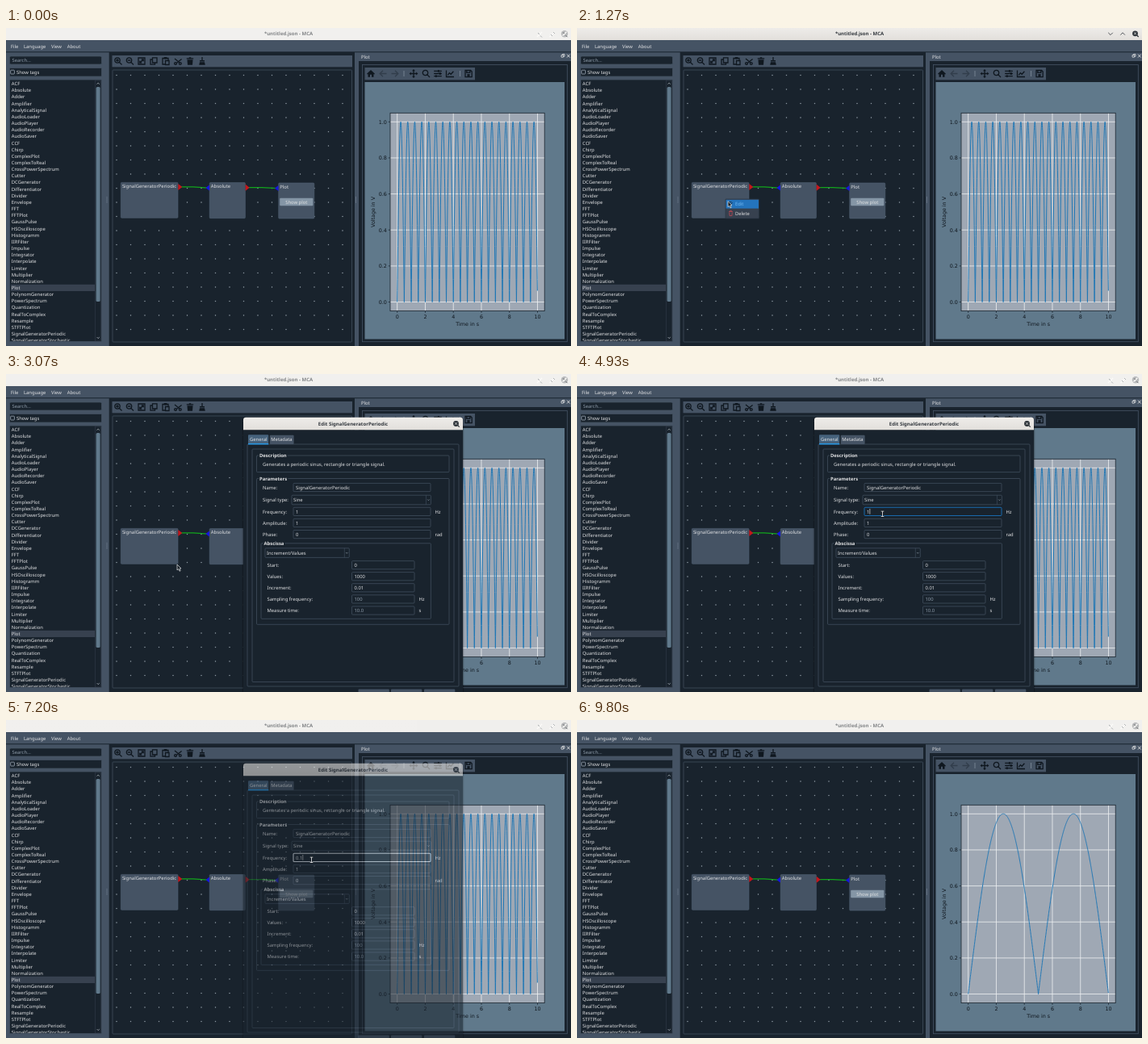
Recreate the animation shown at these times as an HTML page. Size 700x394 px, loop 9.87 s.

```html
<!DOCTYPE html>
<html lang="en">
<head>
<meta charset="utf-8">
<title>Signal editor</title>
<style>
html, body { margin: 0; width: 100%; height: 100%; overflow: hidden; background: #19232d; }
svg { display: block; width: 100vw; height: 100vh; }
text { font: 5.87px "Noto Sans", "Open Sans", sans-serif; fill: #e0e1e3; text-rendering: geometricPrecision; white-space: pre; }
.bold { font-weight: 700; }
.title { font-size: 6px; font-weight: 700; fill: #34393f; }
.dim { fill: #8f9dab; }
.tick { font: 6.35px "DejaVu Sans", sans-serif; fill: #10171e; }
.icon { fill: none; stroke: #0f171f; stroke-width: 1.3; }
.solid { fill: #0f171f; stroke: none; }
</style>
</head>
<body>
<svg id="stage" viewBox="0 0 700 394" preserveAspectRatio="none"></svg>
<script>
const LOOP = 9870;
const BG = '#19232d', GREY = '#455364', LIGHT = '#60798b';
const NS = 'http://www.w3.org/2000/svg';
const stage = document.getElementById('stage');

function add(parent, tag, attrs, content) {
  const el = document.createElementNS(NS, tag);
  for (const k in attrs) el.setAttribute(k, attrs[k]);
  if (content !== undefined) el.textContent = content;
  parent.appendChild(el);
  return el;
}
const group = (p, attrs = {}) => add(p, 'g', attrs);
const box = (p, x1, y1, x2, y2, fill, stroke = 'none', rx = 0, w = 0.7) =>
  add(p, 'rect', { x: x1, y: y1, width: x2 - x1, height: y2 - y1, fill, stroke, rx, 'stroke-width': w });
const text = (p, x, y, str, cls = '', anchor = 'start') =>
  add(p, 'text', { x, y, class: cls, 'text-anchor': anchor }, str);
const path = (p, d, stroke, w = 1, fill = 'none') =>
  add(p, 'path', { d, stroke, 'stroke-width': w, fill });
const icon = (p, x, y, d, solid = '', opacity = 1) => {
  const g = group(p, { transform: `translate(${x} ${y})`, opacity });
  add(g, 'path', { class: 'icon', d });
  if (solid) add(g, 'path', { class: 'solid', d: solid });
};

const LENS = 'M2.2 -1 A3.2 3.2 0 1 0 -4.2 -1 A3.2 3.2 0 1 0 2.2 -1 M1.4 1.4 L4.5 4.5';

function closeButton(p, x, y) {
  add(p, 'circle', { cx: x, cy: y, r: 3.4, fill: '#2c3238' });
  path(p, `M${x - 1.3} ${y - 1.3} l2.6 2.6 m0 -2.6 l-2.6 2.6`, '#f2f1ef', 0.8);
  path(p, `M${x + 2.2} ${y + 2.2} l2 2`, '#2c3238', 1.2);
}

function buildTitleBar() {
  const grad = add(add(stage, 'defs', {}), 'linearGradient', { id: 'bar', x2: 0, y2: 1 });
  add(grad, 'stop', { offset: 0, 'stop-color': '#eeece9' });
  add(grad, 'stop', { offset: 1, 'stop-color': '#e2dfdb' });
  box(stage, 0, 0, 700, 15, '#f1f0ee');
  const active = group(stage), idle = group(stage);
  box(active, 0, 0, 700, 15, 'url(#bar)');
  const name = text(stage, 350, 9.3, '*untitled.json - MCA', 'title', 'middle');
  path(active, 'M658.2 5.8 l2.8 2.8 2.8 -2.8 M673.3 8.6 l2.8 -2.8 2.8 2.8', '#42474c', 0.9);
  closeButton(active, 691.5, 6.8);
  path(idle, 'M658 11 l6 -6 M673.5 11 l6 -6', '#fbfaf8', 1.5);
  path(idle, 'M659 6 l2 2 M662 9.5 l2 2 M675 8 l2 2 M678 5 l2 2', '#9a9da0', 0.8);
  add(idle, 'circle', { cx: 692, cy: 7.2, r: 4.2, fill: '#b9babb' });
  path(idle, 'M689.6 9.6 l4.8 -4.8', '#fbfaf8', 1.4);
  path(idle, 'M690.2 5.4 l1.6 1.6 M693.5 9.2 l2 2', '#55595d', 0.9);
  return { name, active, idle };
}

function buildSidebar() {
  box(stage, 0, 15, 700, 394, GREY);
  box(stage, 0, 29.3, 700, 30.3, BG);
  [['File', 6], ['Language', 22], ['View', 56], ['About', 75.7]].forEach(([s, x]) => text(stage, x, 25, s));
  for (const x of [125, 433.5])
    for (let y = 209.5; y < 216; y += 2) box(stage, x - 0.4, y, x + 0.4, y + 0.8, '#9dabb7');

  box(stage, 4.5, 35, 118.5, 45, BG, GREY, 1.5);
  text(stage, 7.5, 42.2, 'Search...', 'dim');
  box(stage, 4.5, 49.5, 118.5, 60, BG, GREY, 1);
  box(stage, 5.7, 52.2, 10.4, 57, BG, '#9da9b5', 0.8, 0.8);
  text(stage, 13, 56.9, 'Show tags');
  box(stage, 4.5, 64, 118.5, 388.5, BG, GREY, 1);
  box(stage, 6, 317.8, 110, 326, '#37414f');

  const clip = add(stage, 'clipPath', { id: 'list' });
  box(clip, 5, 64.5, 118, 388, '#000');
  const list = group(stage, { 'clip-path': 'url(#list)' });
  ('ACF Absolute Adder Amplifier AnalyticalSignal AudioLoader AudioPlayer AudioRecorder AudioSaver CCF Chirp ' +
   'ComplexPlot ComplexToReal CrossPowerSpectrum Cutter DCGenerator Differentiator Divider Envelope FFT FFTPlot ' +
   'GaussPulse HSOscilloscope Histogramm IIRFilter Impulse Integrator Interpolate Limiter Multiplier ' +
   'Normalization Plot PolynomGenerator PowerSpectrum Quantization RealToComplex Resample STFTPlot ' +
   'SignalGeneratorPeriodic SignalGeneratorStochastic')
    .split(' ').forEach((s, i) => text(list, 6.8, 71.1 + i * 8.158, s));

  box(stage, 110.5, 65, 117.7, 388, BG, '#37414f', 0, 0.5);
  box(stage, 111.6, 73, 116.6, 339, LIGHT, 'none', 1.5);
  path(stage, 'M112.6 69.6 l1.6 -1.6 1.6 1.6 M112.6 383 l1.6 1.6 1.6 -1.6', '#c0c8cf', 0.7);
}

function buildTools() {
  box(stage, 127.7, 30, 432, 394, BG);
  box(stage, 131.5, 34, 429, 48.3, GREY);
  const at = (x, d, s) => icon(stage, x, 41, d, s);
  at(139, LENS + ' M-2.8 -1 h3.6 M-1 -2.8 v3.6');
  at(153.5, LENS + ' M-2.8 -1 h3.6');
  at(168, 'M-4 -4 h8 v8 h-8 z M-2 2 L2 -2 M-0.2 -2.2 H2.2 V0.2 M0.2 2.2 H-2.2 V-0.2');
  at(183, 'M-1.5 -4.2 h5.5 v6.2 h-5.5 z M-1.5 -2 h-2.5 v6.2 h5.5 v-2');
  at(198, 'M-1 4 h-3 v-7.5 h7 v2.5 M-0.5 -0.5 h4.5 v5 h-4.5 z', 'M-2.2 -5 h3.6 v2.4 h-3.6 z');
  at(213, 'M-4 -3 L2.2 2 M-1.8 2.6 L4.6 -2.6 M-4.4 3 a1.4 1.4 0 1 0 2.8 0 a1.4 1.4 0 1 0 -2.8 0 M1.4 3 a1.4 1.4 0 1 0 2.8 0 a1.4 1.4 0 1 0 -2.8 0');
  at(228, '', 'M-4.2 -3.8 h2.6 l0.6 -0.9 h2 l0.6 0.9 h2.6 v1.3 h-8.4 z M-3.5 -1.8 h7 l-0.5 6.6 h-6 z');
  at(243, 'M0 -5 V-0.5', 'M-3 -1 h6 v1.6 h-6 z M-3 1.2 h6 l0.8 3.6 h-7.6 z');
}

function buildCanvas() {
  box(stage, 132, 52, 428.5, 389, BG, GREY, 0.8);
  let dots = '';
  for (let x = 137; x < 428; x += 17.5)
    for (let y = 58.5; y < 388; y += 17.5) dots += `M${x - 0.7} ${y}h1.4m-.7-.7v1.4`;
  path(stage, dots, '#a3afb9', 0.6);

  path(stage, 'M216 196.9 H232 L250 198.1 M299.5 197.7 H317 L336 198.7', '#12a51d', 1.3);
  [[142.3, 191.4, 213, 235.3, 'SignalGeneratorPeriodic'], [252.2, 191.6, 296.4, 235.7, 'Absolute'], [337.7, 192, 381.8, 236, 'Plot']]
    .forEach(([x1, y1, x2, y2, s]) => {
      box(stage, x1, y1, x2, y2, GREY, '#4f6072', 1, 0.6);
      text(stage, x1 + 1.6, y1 + 6.6, s);
    });
  for (const [x, y] of [[213.3, 197], [296.7, 197.7]]) path(stage, `M${x} ${y - 4} l5 4 -5 4 z`, 'none', 0, '#c4161c');
  for (const [x, y] of [[252, 198], [337.5, 198.5]]) path(stage, `M${x} ${y - 3.6} l-4.6 3.6 4.6 3.6 z`, 'none', 0, '#1616dd');
  box(stage, 339.2, 210.8, 380.4, 220.3, '#8596a6', 'none', 1);
  text(stage, 359.8, 217.7, 'Show plot', '', 'middle');
}

function buildPlot() {
  text(stage, 440, 37.6, 'Plot');
  path(stage, 'M688 33.5 h2.6 v2.6 h-2.6 z M689.4 33.4 v-1 h2.6 v2.8 h-1.2', '#e0e1e3', 0.8);
  path(stage, 'M695 32.7 l3.6 3.8 m0 -3.8 l-3.6 3.8', '#e0e1e3', 0.9);
  box(stage, 437, 41, 700, 394, BG);
  box(stage, 441.5, 45.5, 695.3, 388.7, 'none', GREY, 0, 0.8);
  box(stage, 444.5, 49, 581, 64.3, GREY);

  const at = (x, d, s, o) => icon(stage, x, 56.5, d, s, o);
  at(452, '', 'M-5 0.2 L0 -4.5 L5 0.2 L4.2 1 L3.5 0.4 V4.2 H1 V1.2 H-1 V4.2 H-3.5 V0.4 L-4.2 1 z');
  at(467, 'M4.5 0 H-3.5 M0 -3.8 L-3.8 0 L0 3.8', '', 0.35);
  at(482, 'M-4.5 0 H3.5 M0 -3.8 L3.8 0 L0 3.8', '', 0.35);
  at(505, 'M-4 0 H4 M0 -4 V4', 'M-5.4 0 l2.2 -2 v4 z M5.4 0 l-2.2 -2 v4 z M0 -5.4 l-2 2.2 h4 z M0 5.4 l-2 -2.2 h4 z');
  at(520.5, LENS);
  at(535, 'M-4.8 -3.2 H4.8 M-4.8 0 H4.8 M-4.8 3.2 H4.8', 'M0 -4.6 h1.6 v2.8 h-1.6 z M2 -1.4 h1.6 v2.8 h-1.6 z M-3 1.8 h1.6 v2.8 h-1.6 z');
  at(550, 'M-4.5 -4 V4 H5 M-2.8 1.8 L-0.6 -0.8 L1.2 0.8 L4.4 -2.8');
  at(573, 'M-4 -4 h6.6 l1.6 1.6 v6.6 h-8.2 z M-2.2 -3.6 v2.4 h4 v-2.4', 'M-1.6 0.6 h3.2 v2.8 h-3.2 z');
  path(stage, 'M493 53 v7 M562.5 53 v7', '#8997a4', 0.7);

  box(stage, 444.5, 67, 692, 385.5, LIGHT);
  box(stage, 476, 105.3, 667.2, 350.6, '#9fa8b4');
  for (let i = 0; i < 6; i++) {
    const x = 484.7 + i * 34.76, y = 339.5 - i * 44.64;
    path(stage, `M${x} 105.3 V350.6 M476 ${y} H667.2`, '#eef0f2', 0.8);
    path(stage, `M${x} 350.6 v2.3 M476 ${y} h-2.3`, BG, 0.7);
    text(stage, x, 360, i * 2, 'tick', 'middle');
    text(stage, 471.8, y + 2.4, (i * 0.2).toFixed(1), 'tick', 'end');
  }
  const curve = path(stage, '', '#1f77b4', 1);
  curve.setAttribute('stroke-linejoin', 'round');
  box(stage, 476, 105.3, 667.2, 350.6, 'none', BG, 0, 0.8);
  text(stage, 571.7, 368.8, 'Time in s', 'tick', 'middle');
  add(stage, 'text', { transform: 'translate(457.3 228) rotate(-90)', class: 'tick', 'text-anchor': 'middle' }, 'Voltage in V');
  return curve;
}

function wave(freq) {
  let d = '';
  for (let i = 0; i < 1000; i++) {
    const v = Math.abs(Math.sin(2 * Math.PI * freq * i * 0.01));
    d += `${i ? 'L' : 'M'}${(484.7 + i * 0.1738).toFixed(2)} ${(339.5 - 223.2 * v).toFixed(2)}`;
  }
  return d;
}

function buildMenu() {
  const g = group(stage);
  box(g, 184, 212, 225.4, 236, '#37414f', '#2a3542', 0.5);
  const hover = box(g, 184.6, 212.8, 225, 223.6, '#2474bd');
  const label = text(g, 196, 220.4, 'Edit');
  path(g, 'M188 220.8 v-5 h3.5 M189.5 219.5 l3 -3', '#10202e', 0.9);
  text(g, 196, 232.2, 'Delete');
  path(g, 'M188 227.6 h5 M189.6 227.4 v-1 h1.8 v1 M188.7 228.6 l0.4 4 h2.8 l0.4 -4', '#c04a56', 0.8);
  return { g, hover, label };
}

function buildDialog() {
  const g = group(stage);
  box(g, 292.8, 54, 567.2, 400, '#000', 'none', 3).setAttribute('opacity', 0.25);
  path(g, 'M294 69.5 V57 q0 -3.2 3.2 -3.2 H562.8 q3.2 0 3.2 3.2 V69.5 z', 'none', 0, 'url(#bar)');
  text(g, 430, 64.2, 'Edit SignalGeneratorPeriodic', 'title', 'middle');
  closeButton(g, 557.5, 61.5);
  box(g, 294, 69.5, 566, 394, BG);

  box(g, 299, 87, 561, 387, BG, GREY, 1);
  box(g, 300, 75.3, 325.2, 87, '#46627c', 'none', 1);
  box(g, 300, 86, 325.2, 87.4, '#259ae9');
  box(g, 326.8, 75.8, 356.6, 87, GREY, 'none', 1);
  text(g, 302, 83.3, 'General');
  text(g, 328.3, 83.3, 'Metadata');
  box(g, 305, 93, 555, 381.5, BG, GREY, 1);

  const frame = (x1, y1, x2, y2, s) => {
    box(g, x1, y1, x2, y2, 'none', GREY, 1);
    const t = text(g, x1 + 3.5, y1 + 2.4, s, 'bold');
    t.setAttribute('style', `paint-order:stroke;stroke:${BG};stroke-width:3px`);
  };
  frame(310.5, 101, 549, 121.6, 'Description');
  text(g, 318, 113.6, 'Generates a periodic sinus, rectangle or triangle signal.');
  frame(310.5, 129.5, 549, 310.3, 'Parameters');
  frame(316, 209.8, 526.4, 303.3, 'Abscissa');

  const row = (x1, x2, xl, y, label, value, unit, dim) => {
    text(g, xl, y + 2.2, label);
    const field = box(g, x1, y - 5, x2, y + 5.2, BG, GREY, 1);
    const val = text(g, x1 + 3, y + 2.2, value, dim ? 'dim' : '');
    if (unit) text(g, x2 + 5.5, y + 2.2, unit);
    return { field, val };
  };
  const combo = (x1, x2, y, value) => {
    box(g, x1, y - 5.8, x2, y + 5.8, BG, GREY, 1);
    path(g, `M${x2 - 6} ${y - 5.8} v11.6`, GREY, 0.6);
    path(g, `M${x2 - 4.3} ${y - 0.6} l1.3 1.3 1.3 -1.3`, '#9da9b5', 0.6);
    text(g, x1 + 2, y + 2.2, value);
  };
  row(356, 526, 318, 140.4, 'Name:', 'SignalGeneratorPeriodic');
  text(g, 318, 158, 'Signal type:');
  combo(354, 526.4, 156, 'Sine');
  const freq = row(356, 526, 318, 170.3, 'Frequency:', '1', 'Hz');
  row(356, 526, 318, 184.4, 'Amplitude:', '1');
  row(356, 526, 318, 198.5, 'Phase:', '0', 'rad');
  combo(321, 425.3, 221.6, 'Increment/Values');
  row(428.5, 506, 323.5, 236.6, 'Start:', '0');
  row(428.5, 506, 323.5, 250.6, 'Values:', '1000');
  row(428.5, 506, 323.5, 264.7, 'Increment:', '0.01');
  row(428.5, 506, 323.5, 278.8, 'Sampling frequency:', '100', 'Hz', true);
  row(428.5, 506, 323.5, 292.9, 'Measure time:', '10.0', 's', true);
  for (const x of [436.5, 477, 518]) box(g, x, 390.6, x + 38.3, 402, GREY, 'none', 1);
  const caret = path(g, '', '#e0e1e3', 0.7);
  return { g, freq, caret };
}

const bar = buildTitleBar();
buildSidebar();
buildTools();
buildCanvas();
const curve = buildPlot();
const menu = buildMenu();
const dialog = buildDialog();
const arrow = path(stage, 'M0 0 V7 L1.7 5.7 L3 8.3 L4.2 7.7 L3 5.2 L5 4.9 z', '#e6e8ea', 0.7, '#1b2229');
const beam = group(stage);
path(beam, 'M-1.8 -3.2 h3.6 M0 -3.2 v6.4 M-1.8 3.2 h3.6', '#0d1319', 1.7);
path(beam, 'M-1.8 -3.2 h3.6 M0 -3.2 v6.4 M-1.8 3.2 h3.6', '#f0f2f3', 0.8);
const waves = { 1: wave(1), 0.1: wave(0.1) };

// pointer stops: time, x, y
const stops = [
  [130, 290, 360], [900, 184, 212], [1080, 184, 212], [1220, 187, 214.6], [1400, 187, 214.6], [1550, 189.2, 218],
  [2650, 189.2, 218], [3070, 212, 236], [3900, 378.5, 173.3], [8500, 378.5, 173.3], [9350, 400, 150], [9620, 470, -12]
];
// typed values of the frequency field
const typed = [[0, '1'], [5300, ''], [5900, '0'], [6150, '0.'], [6420, '0.1']];

const ramp = (t, a, b) => Math.min(1, Math.max(0, (t - a) / (b - a)));
const show = (el, o) => el.setAttribute('opacity', +o);

function pointer(t) {
  let i = 0;
  while (i < stops.length - 2 && t >= stops[i + 1][0]) i++;
  const [a, x1, y1] = stops[i], [b, x2, y2] = stops[i + 1];
  const k = ramp(t, a, b), e = k * k * (3 - 2 * k);
  return [x1 + (x2 - x1) * e, y1 + (y2 - y1) * e];
}

function draw(t) {
  const live = ramp(t, 130, 260) - ramp(t, 1470, 1600) + ramp(t, 7200, 7340) - ramp(t, 9420, 9560);
  show(bar.active, live);
  show(bar.idle, 1 - live);
  show(bar.name, 0.58 + 0.42 * live);

  curve.setAttribute('d', waves[t < 7270 ? 1 : 0.1]);

  show(menu.g, ramp(t, 930, 1010) - ramp(t, 1380, 1440));
  show(menu.hover, t >= 1140);
  menu.label.style.fill = t >= 1140 ? '#74b9f2' : '#e0e1e3';

  show(dialog.g, ramp(t, 1470, 1620) - ramp(t, 7150, 7270));
  const value = typed.filter(k => k[0] <= t).pop()[1];
  const { field, val } = dialog.freq;
  if (val.textContent !== value) val.textContent = value;
  field.setAttribute('stroke', t >= 5300 ? '#dfe6ec' : t >= 3800 ? '#1a72bb' : GREY);
  field.setAttribute('stroke-width', t >= 5300 ? 1.1 : t >= 3800 ? 0.9 : 0.7);
  const end = 359.5 + 5.87 * [...value].reduce((w, c) => w + (c === '.' ? 0.268 : 0.572), 0);
  dialog.caret.setAttribute('d', `M${end} 166.9 v6.8`);
  show(dialog.caret, t >= 4300);

  const [x, y] = pointer(t);
  const inField = t >= 3800 && t < 7220;
  show(arrow, t >= 130 && t < 9620 && !inField);
  show(beam, inField);
  arrow.setAttribute('transform', `translate(${x} ${y})`);
  beam.setAttribute('transform', `translate(${x} ${y})`);
}

const start = performance.now();
function tick() {
  draw((performance.now() - start) % LOOP);
  requestAnimationFrame(tick);
}
draw(0);
requestAnimationFrame(tick);
</script>
</body>
</html>
```
